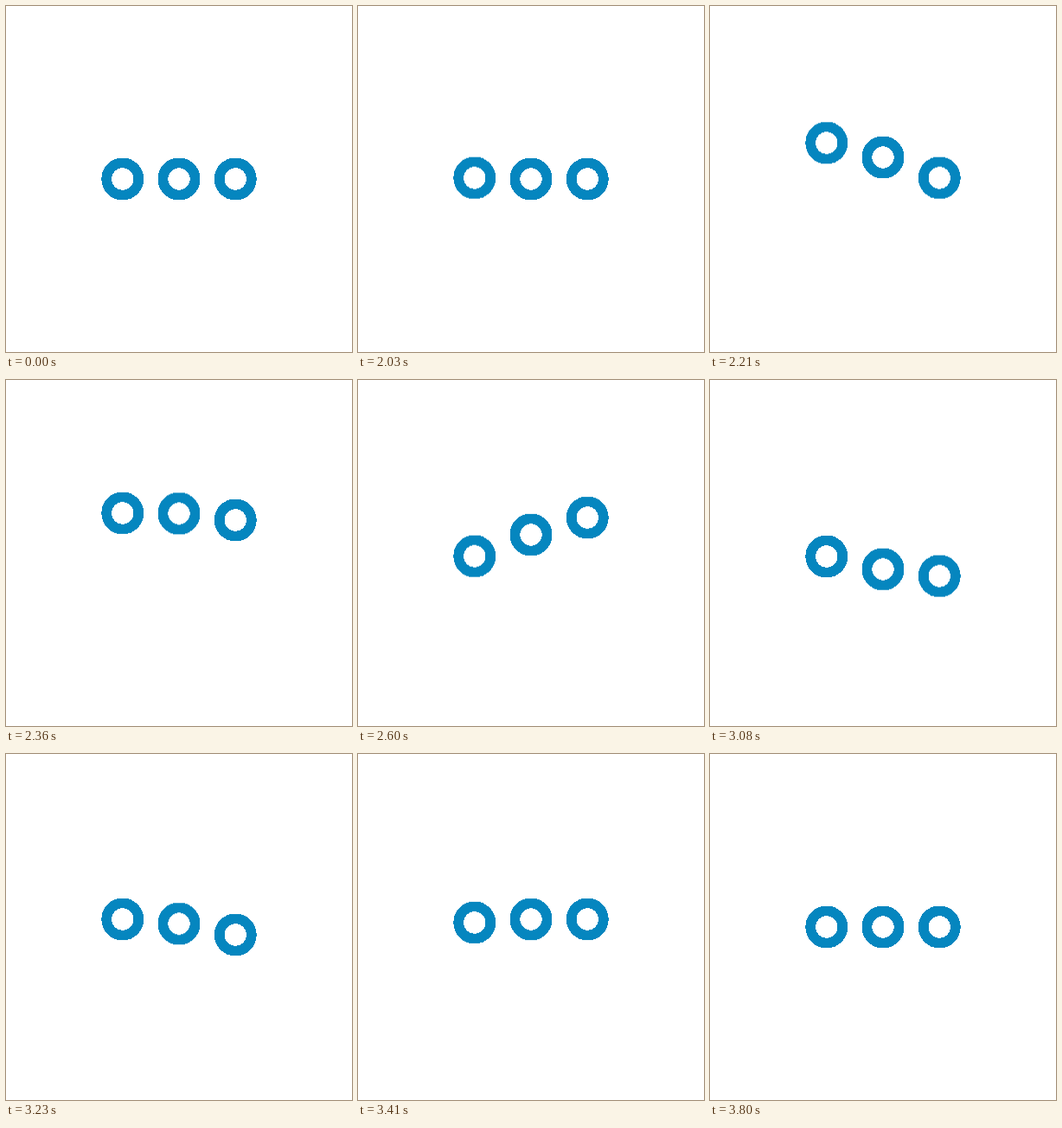
An HTML page that plays this animation: 400x400 px, repeating every 3.83 s.

```html
<!DOCTYPE html>
<html lang="en">
<head>
<meta charset="utf-8">
<title>Bouncing rings</title>
<style>
  html, body { margin: 0; width: 100%; height: 100%; overflow: hidden; background: #fff; }
  svg { display: block; width: 100vw; height: 100vh; }

  /* The script scrubs the paused bounce through --t (ms). */
  circle {
    fill: none;
    stroke: #0586bf;
    stroke-width: 11.8;
    shape-rendering: crispEdges;
    animation: bounce 1620ms both paused;
    animation-delay: calc((var(--lag) - var(--t, 0)) * 1ms);
  }

  @keyframes bounce {
    0%     { transform: translateY(0);       animation-timing-function: cubic-bezier(.34, 0, .25, 1); }
    20.37% { transform: translateY(-46.7px); animation-timing-function: cubic-bezier(.4, 0, .42, 1); }
    51.85% { transform: translateY(27.8px);  animation-timing-function: cubic-bezier(.48, 0, .47, 1); }
    78.7%  { transform: translateY(-9.5px);  animation-timing-function: cubic-bezier(.3, 0, .48, 1); }
    100%   { transform: translateY(0); }
  }
</style>
</head>
<body>
<svg viewBox="0 0 400 400">
  <circle cx="134.8" cy="200" r="18.6" style="--lag: 0"/>
  <circle cx="200" cy="200" r="18.6" style="--lag: 90"/>
  <circle cx="265.2" cy="200" r="18.6" style="--lag: 180"/>
</svg>
<script>
  const LOOP = 3830, REST = 2000, STEP = 30;
  const svg = document.querySelector('svg');
  const start = performance.now();

  function draw() {
    const time = (performance.now() - start) % LOOP;
    const step = Math.max(0, Math.floor((time - REST) / STEP));
    svg.style.setProperty('--t', step * STEP);
    requestAnimationFrame(draw);
  }
  draw();
</script>
</body>
</html>
```
